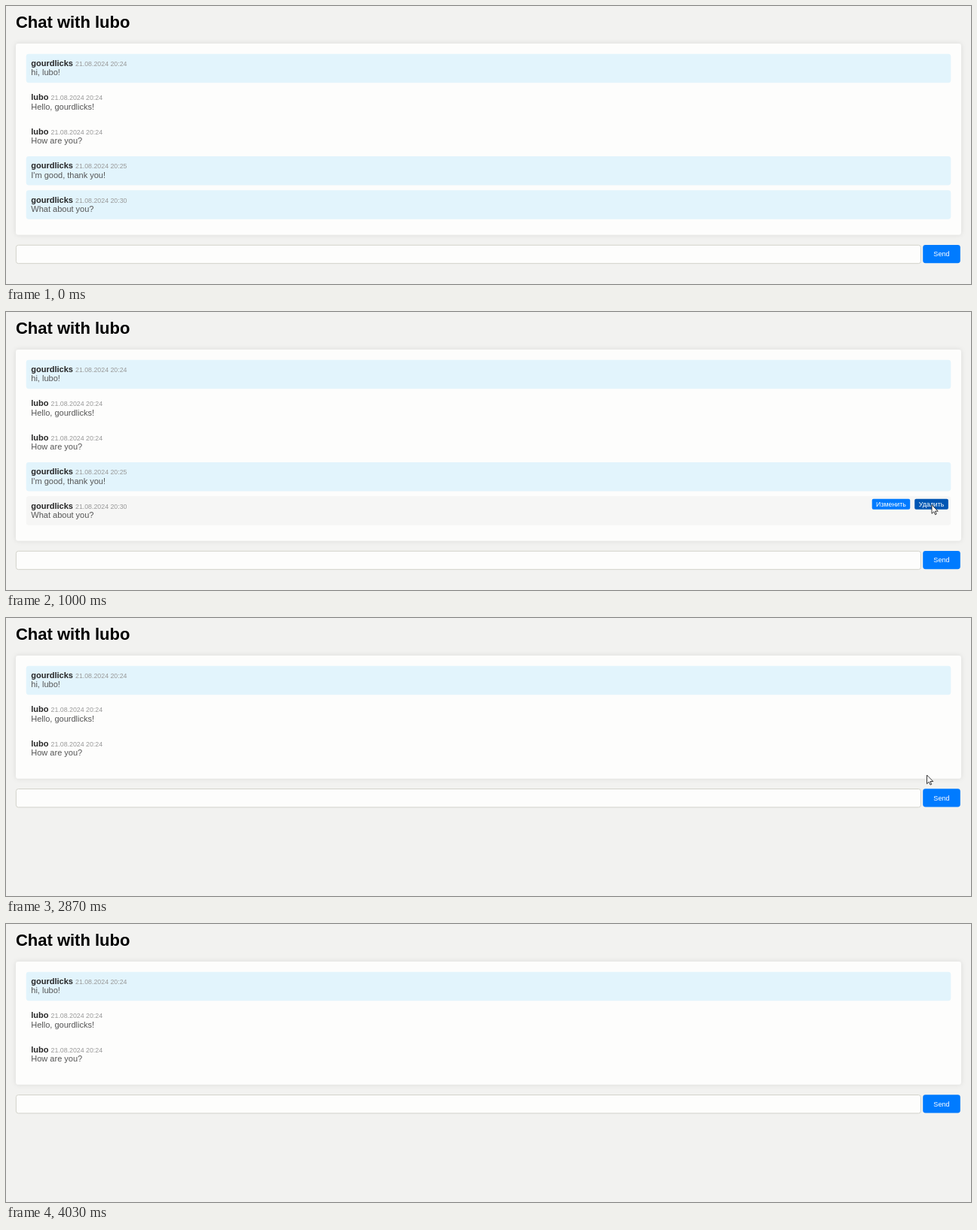
Write an HTML page that moves like this. It is 1280 px wide and 370 px high and loops after 4.46 s.

```html
<!DOCTYPE html>
<html lang="en">
<head>
<meta charset="utf-8">
<title>Chat</title>
<style>
  html, body { margin: 0; width: 100%; height: 100%; overflow: hidden; background: #f2f2f0; }
  svg { display: block; width: 1280px; height: 370px; font-family: "Liberation Sans", Arial, sans-serif; }
  .title { font: bold 22px "Liberation Sans", Arial, sans-serif; }
  .name { font-size: 11px; font-weight: bold; fill: #262626; }
  .date { font-size: 8.8px; fill: #999; }
  .body { font-size: 11px; fill: #555; }
  .label { font-size: 8.8px; fill: #fff; text-anchor: middle; }
  .send { font-size: 9.17px; }
</style>
</head>
<body>
<svg id="stage" viewBox="0 0 1280 370" xmlns="http://www.w3.org/2000/svg">
  <defs>
    <filter id="shadow" filterUnits="userSpaceOnUse" x="0" y="30" width="1280" height="300">
      <feDropShadow dx="0" dy="0" stdDeviation="3.4" flood-color="#000" flood-opacity=".1"/>
    </filter>
  </defs>
  <rect width="1280" height="370" fill="#f2f2f0"/>
  <text class="title" x="12.9" y="29.3">Chat with lubo</text>
  <rect id="panel" x="13" y="50" width="1254" rx="3.4" fill="#fdfdfc" filter="url(#shadow)"/>
  <g id="rows"></g>
  <g id="form">
    <rect x="13.4" y="13.9" width="1200" height="24.4" rx="3" fill="#fdfdfc" stroke="#cfcfc6" stroke-width=".9"/>
    <rect x="1216.2" y="13.6" width="49.6" height="24.2" rx="3.4" fill="#007bff"/>
    <text class="label send" x="1241" y="28.9">Send</text>
  </g>
  <path id="cursor" d="M0 0V17L4 13.3L6.6 19L9 18L6.5 12.4H12Z" fill="#fff" stroke="#222" stroke-width="1.3"/>
</svg>
<script>
const LOOP = 4460, TOP = 63.75, PITCH = 45.375, ROW_H = 38.5, HOVER_LAG = 60;
const BLUE = "#007bff", DARK_BLUE = "#0056b3";
const ME = "gourdlicks", FRIEND = "lubo";
const $ = id => document.getElementById(id);

// author, time, text, moment of deletion
const messages = [
  [ME, "20:24", "hi, lubo!", Infinity],
  [FRIEND, "20:24", "Hello, gourdlicks!", Infinity],
  [FRIEND, "20:24", "How are you?", Infinity],
  [ME, "20:25", "I'm good, thank you!", 2870],
  [ME, "20:30", "What about you?", 1500]
];

// time, x, y of the pointer tip
const path = [
  [60, 1246, 372], [130, 1241, 325], [220, 1235, 293], [350, 1231, 281], [500, 1229, 277],
  [700, 1229, 269], [900, 1228, 259], [1070, 1228, 255], [1870, 1228, 255],
  [1990, 1227, 240], [2100, 1225, 234], [2370, 1222, 219], [2500, 1221.5, 212],
  [2670, 1221.5, 209], [3370, 1221.5, 209], [3430, 1160, 196], [3500, 1010, 176],
  [3600, 776, 142], [3700, 590, 85], [3830, 400, -14]
];

function add(parent, tag, attrs, text) {
  const node = document.createElementNS("http://www.w3.org/2000/svg", tag);
  for (const key in attrs) node.setAttribute(key, attrs[key]);
  if (text) node.textContent = text;
  return parent.appendChild(node);
}

function addButton(parent, x, width, label) {
  const rect = add(parent, "rect", { x, y: 3.4, width, height: 14.2, rx: 2, fill: BLUE });
  add(parent, "text", { class: "label", x: x + width / 2, y: 13.5 }, label);
  return rect;
}

const rows = messages.map(([author, time, text, deleted], i) => {
  const y = TOP + i * PITCH, mine = author === ME;
  const group = add($("rows"), "g", { transform: `translate(0 ${y})` });
  const back = add(group, "rect", { x: 26.75, y: 0, width: 1226.5, height: ROW_H, rx: 3.4 });
  add(group, "text", { class: "name", x: 33.3, y: 16.3 }, author);
  add(group, "text", { class: "date", x: mine ? 92 : 59.6, y: 16.3 }, "21.08.2024 " + time);
  add(group, "text", { class: "body", x: 33.3, y: 28.7 }, text);
  const row = { y, mine, deleted, group, back };
  if (mine) {
    row.tools = add(group, "g", {});
    addButton(row.tools, 1148.7, 50.5, "Изменить");
    row.remove = addButton(row.tools, 1205.2, 44.7, "Удалить");
  }
  return row;
});

function pointerAt(t) {
  const next = path.findIndex(key => key[0] > t);
  if (next < 1) return null;
  const [t0, x0, y0] = path[next - 1], [t1, x1, y1] = path[next];
  const k = (t - t0) / (t1 - t0);
  return { x: x0 + (x1 - x0) * k, y: y0 + (y1 - y0) * k };
}

const show = (node, on) => node.setAttribute("display", on ? "inline" : "none");

function render(t) {
  const pointer = pointerAt(t), hover = pointerAt(t - HOVER_LAG);
  let count = 0;
  for (const row of rows) {
    const alive = t < row.deleted;
    const dy = hover ? hover.y - row.y : -1;
    const hovered = alive && dy >= 0 && dy <= ROW_H;
    count += alive;
    show(row.group, alive);
    row.back.setAttribute("fill", hovered ? "#f6f6f5" : row.mine ? "#e2f4fc" : "none");
    if (!row.mine) continue;
    show(row.tools, hovered);
    const onRemove = hovered && hover.x > 1205 && hover.x < 1250 && dy > 3.4 && dy < 17.6;
    row.remove.setAttribute("fill", onRemove ? DARK_BLUE : BLUE);
  }
  const height = 27.5 + count * PITCH;
  $("panel").setAttribute("height", height);
  $("form").setAttribute("transform", `translate(0 ${50 + height})`);
  show($("cursor"), pointer);
  if (pointer) $("cursor").setAttribute("transform", `translate(${pointer.x} ${pointer.y}) scale(.6875)`);
}

const start = performance.now();
function tick() {
  render((performance.now() - start) % LOOP);
  requestAnimationFrame(tick);
}
tick();
</script>
</body>
</html>
```
